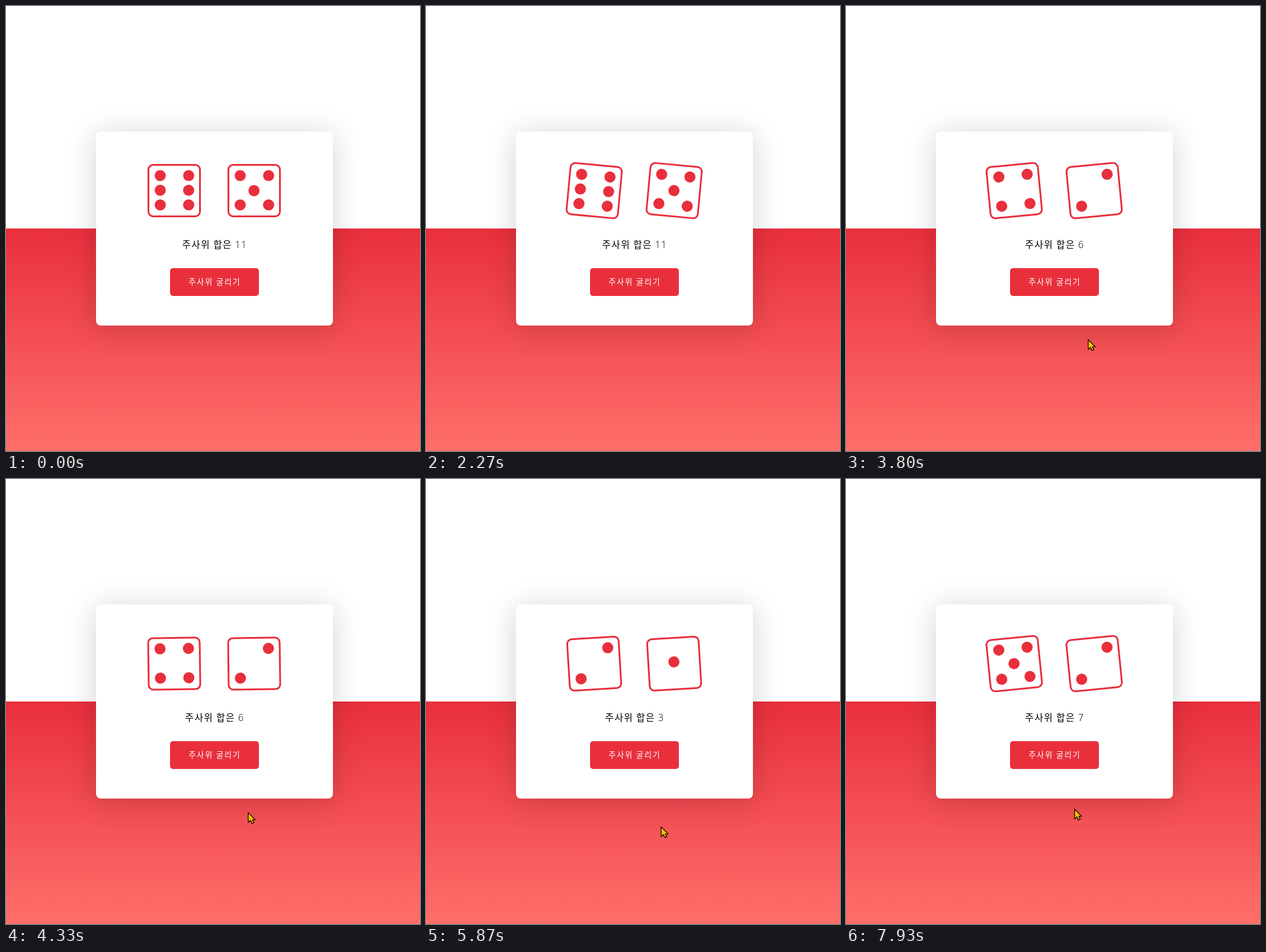
An HTML page that plays this animation: 699 px wide and 752 px high, repeating every 8000 ms.

```html
<!DOCTYPE html>
<html lang="ko">
<head>
<meta charset="utf-8">
<title>주사위 굴리기</title>
<style>
  html, body { margin: 0; width: 100%; height: 100%; overflow: hidden; background: #fff; }
  .floor { position: absolute; left: 0; top: 376px; width: 699px; height: 376px;
    background: linear-gradient(#e92f3c, #ff6f6a); }
  .card { position: absolute; left: 152px; top: 212px; width: 400px; height: 328px;
    border-radius: 8px; background: #fff; box-shadow: 0 5px 50px rgba(0, 0, 0, .18); }
  svg { position: absolute; left: 0; top: 0; }
  text { font-family: "Open Sans", "Noto Sans CJK KR Light", "Noto Sans CJK KR", sans-serif;
    font-weight: 300; text-anchor: middle; }
  #total { font-size: 16px; letter-spacing: 1.1px; }
  #label { font-size: 13.33px; letter-spacing: 1.6px; fill: #fff; }
  .die rect { fill: #fff; stroke: #e92f3c; stroke-width: 3; }
  .die circle, .button { fill: #e92f3c; }
  #cursor path { fill: url(#gold); stroke: #1a0a00; stroke-width: 1.4; stroke-linejoin: round; }
  #cursor .lines { fill: none; stroke-width: 1.1; }
</style>
</head>
<body>
<div class="floor"></div>
<div class="card"></div>
<svg width="699" height="752">
  <defs>
    <linearGradient id="gold" x2="0" y2="1">
      <stop stop-color="#ffd400"/><stop offset="1" stop-color="#ffae00"/>
    </linearGradient>
  </defs>
  <g class="die"></g>
  <g class="die"></g>
  <text id="total" x="352.3" y="409"></text>
  <rect class="button" x="277" y="443" width="150" height="47" rx="5"/>
  <text id="label" x="352.3" y="471">주사위 굴리기</text>
  <g id="cursor">
    <path id="arrow" d="M1 1V17.5L4.8 14 7.4 19.2 10.4 17.8 8 12.9H13Z"/>
    <g id="hand" transform="translate(-7)">
      <path d="M5.7 13V2.3a1.5 1.5 0 0 1 3 0V7q2.6-1 2.9.6 2.6-.8 2.9.7 2.6-.5 2.6 1.7v5q0 6-6 6H10q-3 0-4.6-3L1 12.3q-.6-1.6 1-2 1.3-.2 3.7 2.7Z"/>
      <path class="lines" d="M8.7 7v4M11.6 7.6v3.6M14.5 8.3v3"/>
    </g>
  </g>
</svg>
<script>
const LOOP = 8000, STEP = 200 / 3;
const SHAKE = 1000, FACE_DELAY = 1060, GLIDE = 265;
const $ = id => document.getElementById(id);
const dice = [...document.querySelectorAll('.die')];

const rolls = [
  { at: -SHAKE * 2, faces: [6, 5] },
  { at: 1383, faces: [4, 2] },
  { at: 3516, faces: [2, 1] },
  { at: 5260, faces: [5, 2] },
  { at: 7293, faces: [5, 2] }
];

// Where the pointer rests; each glide there ends at the given time.
const stops = [
  { at: 0, x: 398, y: 755 },
  { at: 760, x: 346, y: 463 },
  { at: 1785, x: 478, y: 772 },
  { at: 2300, x: 720, y: 780 },
  { at: 2565, x: 720, y: 545 },
  { at: 2890, x: 268, y: 459 },
  { at: 3200, x: 346, y: 458 },
  { at: 3795, x: 408, y: 563 },
  { at: 5000, x: 361, y: 467 },
  { at: 5530, x: 396, y: 587 },
  { at: 6730, x: 355, y: 474 },
  { at: 7600, x: 385, y: 557 }
];

// The CSS "ease" curve, solved by bisection.
const bezier = (a, b, u) => 3 * a * u * (1 - u) ** 2 + 3 * b * u * u * (1 - u) + u ** 3;
function ease(x) {
  let lo = 0, hi = 1;
  for (let i = 0; i < 20; i++) {
    const mid = (lo + hi) / 2;
    if (bezier(.25, .25, mid) < x) lo = mid; else hi = mid;
  }
  return bezier(.1, 1, lo);
}

function shakeAngle(ms) {
  if (ms >= SHAKE) return 0;
  const half = ms % 500 / 250;
  return half < 1 ? 8 - 16 * ease(half) : 16 * ease(half - 1) - 8;
}

function pointerAt(t) {
  const i = stops.findLastIndex(s => t >= s.at - GLIDE);
  const to = stops[i], from = stops[Math.max(i - 1, 0)];
  const k = Math.min((t - to.at) / GLIDE + 1, 1), s = k * (2 - k);
  const mix = axis => Math.round(from[axis] + (to[axis] - from[axis]) * s);
  return [mix('x'), mix('y')];
}

function pips(n) {
  const pair = (x, y) => [[.4 + x, y - .6], [.4 - x, -y - .6]];
  return [
    ...(n % 2 ? [[-.3, n === 1 ? -3 : 0]] : []),
    ...(n > 1 ? pair(24, -24.8) : []),
    ...(n > 3 ? pair(24, 24.8) : []),
    ...(n > 5 ? pair(24, 0) : [])
  ];
}

function drawDie(die, i, face, angle) {
  if (die.face !== face) {
    die.face = face;
    die.innerHTML = '<rect x="-43.5" y="-43.5" width="87" height="87" rx="8"/>' +
      pips(face).map(([x, y]) => `<circle cx="${x}" cy="${y}" r="9.4"/>`).join('');
  }
  die.setAttribute('transform', `translate(${284 + 135 * i} 312) rotate(${angle})`);
}

function draw(t) {
  const latest = delay => rolls.findLast(r => t >= r.at + delay);
  const faces = latest(FACE_DELAY).faces;
  const angle = shakeAngle(t - latest(0).at);
  dice.forEach((die, i) => drawDie(die, i, faces[i], angle));
  const [a, b] = latest(SHAKE).faces;
  $('total').textContent = `주사위 합은 ${a + b}`;

  const [x, y] = pointerAt(t);
  const over = x >= 277 && x < 427 && y >= 443 && y < 490;
  $('hand').style.display = over ? '' : 'none';
  $('arrow').style.display = over ? 'none' : '';
  $('cursor').setAttribute('transform', `translate(${x} ${y})`);
}

// The picture advances in fixed steps of 1/15 s.
function tick() {
  const t = performance.now() % LOOP;
  draw(Math.min(Math.floor((t + 4) / STEP), LOOP / STEP - 1) * STEP);
  requestAnimationFrame(tick);
}
tick();
</script>
</body>
</html>
```
